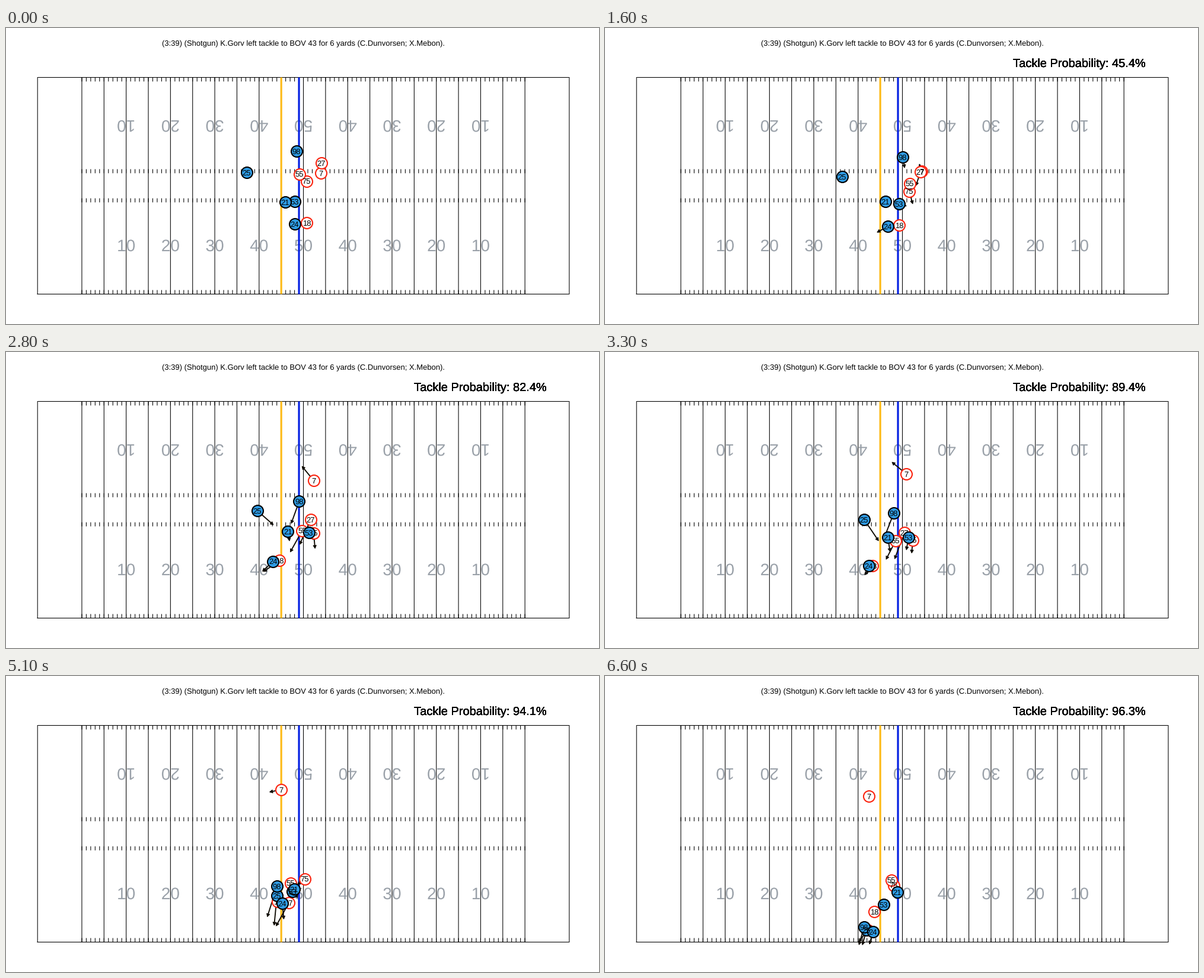
Write a matplotlib script that moves like this. It is 1000 px wide and 500 px high and loops after 6.7 s.

```python
import numpy as np
import matplotlib.pyplot as plt
from matplotlib.animation import FuncAnimation
from matplotlib.collections import PolyCollection
from matplotlib.patches import PathPatch
from matplotlib.textpath import TextPath
from matplotlib.transforms import Affine2D

plt.rcParams["font.family"] = "Liberation Sans"
plt.rcParams["text.hinting"] = "none"
plt.rcParams["text.hinting_factor"] = 1

PX = 0.72  # points per pixel at 100 dpi
STEP = 100
FRAMES = 67
TITLE = ("(3:39) (Shotgun) K.Gorv left tackle to BOV 43 for 6 yards "
         "(C.Dunvorsen; X.Mebon).")

# Each player runs a smooth curve through five points, back to front
KEYS = np.array([0, 1.6, 3.3, 5.1, 6.6])
OFFENSE = {
    75: [(507, 259), (513, 276), (519, 318), (504, 343), (487, 354)],
    7: [(531, 245), (534, 242), (508, 206), (464, 192), (445, 203)],
    55: [(495, 247), (514, 263), (490, 319), (480, 350), (483, 345)],
    27: [(532, 228), (532, 243), (505, 305), (477, 383), (443, 429)],
    18: [(507, 329), (496, 333), (451, 361), (458, 381), (454, 398)],
}
DEFENSE = {
    25: [(406, 244), (400, 251), (437, 283), (457, 371), (441, 429)],
    98: [(490, 208), (502, 218), (487, 272), (457, 355), (437, 424)],
    53: [(487, 293), (496, 297), (512, 313), (483, 364), (470, 386)],
    24: [(487, 331), (477, 335), (445, 361), (466, 384), (452, 432)],
    21: [(471, 294), (473, 293), (477, 313), (486, 360), (493, 365)],
}
CHANCE_TIMES = [1.6, 2.3, 3.3, 4.1, 5.1, 6.6]
CHANCE = [45.4, 75.4, 89.4, 92.6, 94.1, 96.3]


def key_velocity(p):
    """Cubic spline slopes: at rest at the snap, slowing at the end."""
    n = len(KEYS)
    h = np.diff(KEYS)
    slope = np.diff(p, axis=0) / h[:, None]
    m, rhs = np.eye(n), np.zeros_like(p)
    rhs[-1] = 0.65 * slope[-1]
    for i in range(1, n - 1):
        a, b = 1 / h[i - 1], 1 / h[i]
        m[i, i - 1:i + 2] = a, 2 * (a + b), b
        rhs[i] = 3 * (a * slope[i - 1] + b * slope[i])
    return np.linalg.solve(m, rhs)


def track(points):
    """Position and velocity of one player in every animation frame."""
    p = np.array(points, float)
    v = key_velocity(p)
    t = np.arange(FRAMES) * STEP / 1000
    i = np.clip(np.searchsorted(KEYS, t, side="right") - 1, 0, len(KEYS) - 2)
    h = (KEYS[i + 1] - KEYS[i])[:, None]
    u = (t - KEYS[i])[:, None] / h
    pos = ((2*u**3 - 3*u**2 + 1) * p[i] + (u**3 - 2*u**2 + u) * h * v[i]
           + (3*u**2 - 2*u**3) * p[i + 1] + (u**3 - u**2) * h * v[i + 1])
    vel = (6*(u**2 - u) / h * (p[i] - p[i + 1])
           + (3*u**2 - 4*u + 1) * v[i] + (3*u**2 - 2*u) * v[i + 1])
    return pos, vel


def yard_x(yd):
    return 53.2 + 7.472 * yd


def yard_y(yd):
    return 449.5 - 6.863 * yd


fig = plt.figure(figsize=(10, 5), dpi=100, facecolor="white")
ax = fig.add_axes([0, 0, 1, 1])
ax.set(xlim=(0, 1000), ylim=(500, 0))
ax.axis("off")


def label(x, y, text, size, z):
    return ax.text(x, y, text, fontsize=size * PX, ha="center", va="baseline", zorder=z)


def vlines(xs, low, high, color="black", width=1.07, z=1):
    ax.vlines(xs, yard_y(low), yard_y(high), colors=color, linewidth=width * PX,
              zorder=z, snap=False)


def yard_number(x, y, text, turn):
    """Two digits centred on x, y; turn is -1 for upside down."""
    place = Affine2D().scale(turn, -turn).translate(x, y)
    ax.add_patch(PathPatch(TextPath((-15.6, -9.9), text, size=28),
                           transform=place + ax.transData,
                           facecolor="#9aa1a9", edgecolor="none", zorder=2))


# Field
WIDE = 53.33
HASH = 23.58
ax.plot(yard_x(np.array([0, 120, 120, 0, 0])), yard_y(np.array([0, 0, WIDE, WIDE, 0])),
        color="black", lw=1.07 * PX, zorder=1, snap=False)
vlines(yard_x(np.arange(10, 111, 5)), 0, WIDE)
for low in (0, HASH - 1, WIDE - HASH, WIDE - 1):
    vlines(yard_x(np.arange(10, 111)), low, low + 1)
for yd in range(20, 101, 10):
    mark = str(50 - abs(yd - 60))
    yard_number(yard_x(yd), yard_y(12), mark, 1)
    yard_number(yard_x(yd), yard_y(WIDE - 12), mark, -1)
vlines([yard_x(55)], 0, WIDE, "#fdbb1a", 3.2, 3)
vlines([yard_x(59)], 0, WIDE, "#0520e2", 3.2, 3)

label(501.3, 30.3, TITLE, 13.05, 9)
# Stacked copies give the heavy edges of overprinted text
chance_labels = [label(799.8, 66.2, "", 20, 9) for _ in range(5)]

# Players
INK = "#100c04"
shafts, = ax.plot([], [], color=INK, lw=1.9 * PX, solid_capstyle="butt", zorder=4)
heads = PolyCollection([], facecolor=INK, edgecolor=INK, linewidth=PX, zorder=4)
ax.add_collection(heads)


def make_team(players, fill, edge, z):
    pos, vel = (np.array(a) for a in zip(*map(track, players.values())))
    dots = ax.scatter(pos[:, 0, 0], pos[:, 0, 1], s=(19 * PX) ** 2, facecolors=fill,
                      edgecolors=edge, linewidths=2.1 * PX, zorder=z)
    nums = [label(0, 0, str(n), 13, z + 1) for n in players]
    return pos, vel, dots, nums


teams = [make_team(OFFENSE, "white", "#fb2410", 5),
         make_team(DEFENSE, "#2f9ce5", "black", 7)]


def arrow_head(tip, vel):
    d = vel / max(np.hypot(*vel), 1e-6)
    side = np.array([-d[1], d[0]])
    base = tip - 5 * d
    return [tip, base + 2.6 * side, base - 2.6 * side]


def update(k):
    line, tips = [], []
    for pos, vel, dots, nums in teams:
        dots.set_offsets(pos[:, k])
        for num, p, v in zip(nums, pos[:, k], vel[:, k]):
            num.set_position((p[0], p[1] + 4.8))
            # Arrows reach to where the player would be one second later
            line += [p, p + v * 0.95, (np.nan, np.nan)]
            tips.append(arrow_head(p + v, v))
    shafts.set_data(*np.array(line).T)
    heads.set_verts(tips)
    t = k * STEP / 1000
    text = f"Tackle Probability: {np.interp(t, CHANCE_TIMES, CHANCE):.1f}%"
    for item in chance_labels:
        item.set_text(text if t >= 1.5 else "")
    return []


anim = FuncAnimation(fig, update, frames=FRAMES, interval=STEP, repeat=True,
                     repeat_delay=0, init_func=lambda: update(0), blit=False)
plt.show()
```
